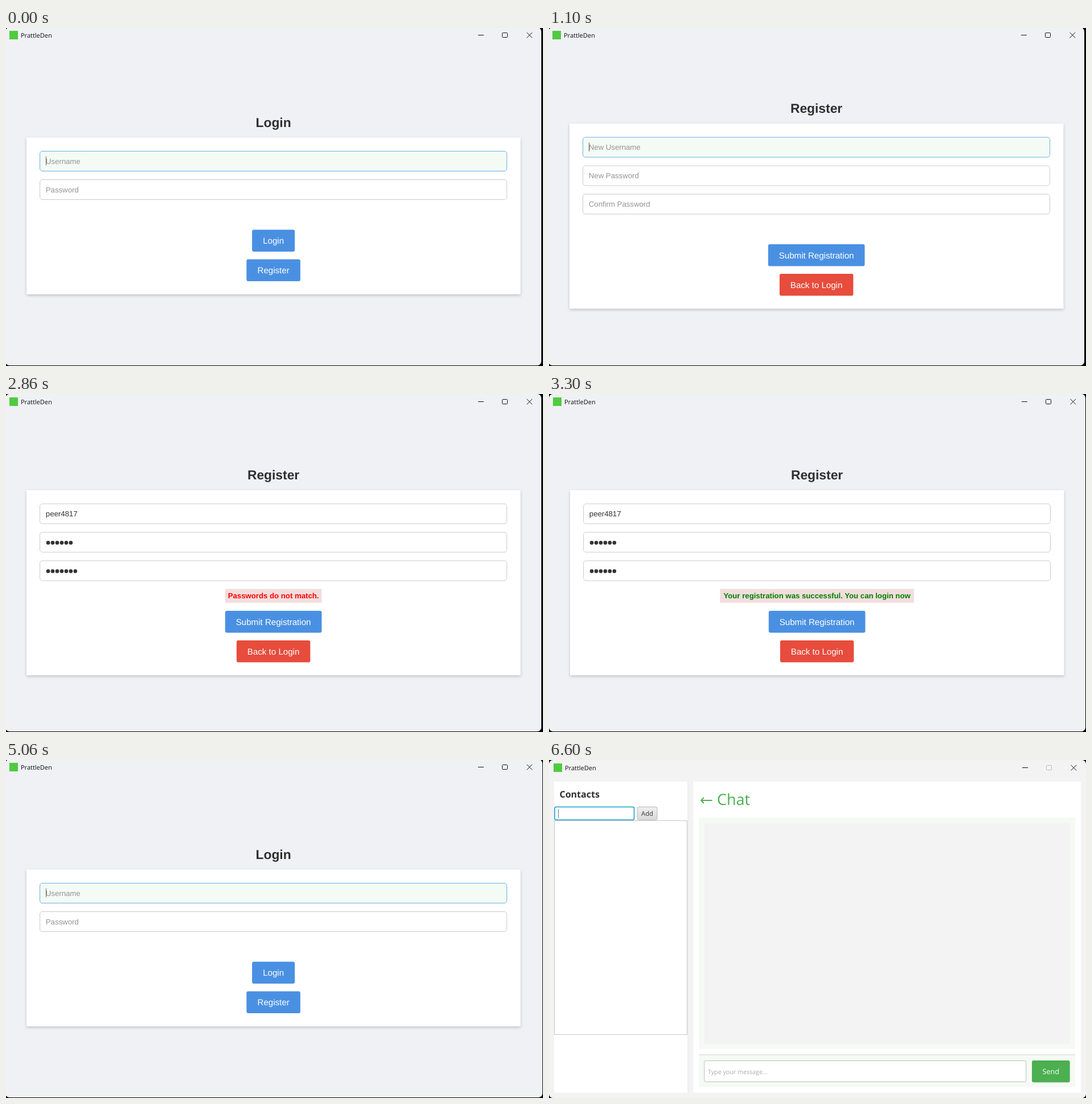
Recreate the animation shown at these times as an HTML page. Size 943 by 594 pixels, loop 7.7 s.

```html
<!DOCTYPE html>
<html lang="en">
<head>
<meta charset="utf-8">
<title>Chat sign-in</title>
<style>
  html, body { margin: 0; width: 100%; height: 100%; overflow: hidden; background: #000; }
  svg { display: block; width: 943px; height: 594px; }
  text { font-family: "Liberation Sans", Arial, sans-serif; text-rendering: geometricPrecision; white-space: pre; }
  .ui { font-family: "Open Sans", "Noto Sans", sans-serif; }
  .card { filter: drop-shadow(0 2px 2.5px rgba(0, 0, 0, .2)); }
</style>
</head>
<body>
<svg id="stage" viewBox="0 0 943 594"></svg>
<script>
const STEP = 1100;
const MID = 469.6;
const APP = 'PrattleDen';
const USER = 'peer4817';
const BLUE = '#4a90e2', RED = '#e74c3c', GREEN = '#4caf50', MINT = '#f4faf4';

const rect = (x, y, w, h, fill, more = '') =>
  `<rect x="${x}" y="${y}" width="${w}" height="${h}" fill="${fill}" ${more}/>`;
const text = (x, y, size, fill, str, more = '') =>
  `<text x="${x}" y="${y}" font-size="${size}" fill="${fill}" ${more}>${str}</text>`;
const line = (d, color, width = 1) =>
  `<path d="${d}" fill="none" stroke="${color}" stroke-width="${width}"/>`;
const at = (x, y, body) => `<g transform="translate(${x} ${y})">${body}</g>`;
const CENTER = 'text-anchor="middle"';
const BOLD = 'font-weight="bold"';
const UI = 'class="ui"';

function titleBar(canMaximize) {
  return rect(6, 5, 15, 15, '#4fcb3f') +
    text(26, 17, 11, '#111', APP, UI) +
    line('M829 12.5h10', '#111') +
    rect(871.5, 8.5, 9, 8, 'none', `rx="1" stroke="${canMaximize ? '#111' : '#bdbdbd'}"`) +
    line('M914.5 7.8l9.6 9.6m0-9.6l-9.6 9.6', '#111');
}

// value: text, or a number of password dots
function field(y, { hint, value, focus }) {
  let out = rect(59.5, y, 820, 35, focus ? MINT : '#fff',
    `rx="4.5" stroke="${focus ? '#66b2e8' : '#cacaca'}"`);
  let end = 70.4;
  if (hint) out += text(69.8, y + 22.3, 13.2, '#949494', hint);
  if (typeof value === 'string') out += text(69.8, y + 22.3, 13.2, '#333', value);
  if (typeof value === 'number') {
    for (let i = 0; i < value; i++)
      out += `<circle cx="${74 + i * 7.95}" cy="${y + 18.4}" r="3.3" fill="#333"/>`;
    end = 70.3 + value * 7.95;
  }
  if (focus) out += line(`M${end} ${y + 9}v16`, '#666');
  return out;
}

function button(y, width, color, label) {
  return rect(MID - width / 2, y, width, 38.5, color, 'rx="3"') +
    text(MID, y + 24.8, 15.1, '#fff', label, CENTER);
}

function form(title, top, height, fields, buttons, note = '') {
  return text(MID, top - 18.8, 22.8, '#2f2f2f', title, `${CENTER} ${BOLD}`) +
    rect(36, top, 867.5, height, '#fff', 'class="card"') +
    fields.map((f, i) => field(top + 24 + i * 50, f)).join('') + note +
    buttons.map((b, i) => button(top + height - 113.4 + i * 52, ...b)).join('');
}

const login = (...fields) => form('Login', 192.5, 275.5, fields,
  [[75, BLUE, 'Login'], [94.5, BLUE, 'Register']]);

const register = (fields, note) => form('Register', 168, 325.3, fields,
  [[169.6, BLUE, 'Submit Registration'], [129.4, RED, 'Back to Login']], note);

const notice = (width, color, str) =>
  rect(MID - width / 2, 341.5, width, 24.5, '#f2dede') +
  text(MID, 358.3, 13.2, color, str, `${CENTER} ${BOLD}`);

function chat() {
  return rect(9, 38, 234.5, 546.5, '#fff', 'class="side"') +
    line('M244 38v546', '#e6e6e6') +
    text(18.5, 66, 16, '#2f2f2f', 'Contacts', `${UI} ${BOLD}`) +
    rect(9.5, 106.5, 233, 376, '#fff', 'stroke="#c8c8c8"') +
    rect(10, 82.5, 139.5, 22.7, '#fff', 'rx="2.5" stroke="#1a9fcf" stroke-width="1.6"') +
    line('M16.5 86v16', '#777') +
    rect(155, 82.5, 35, 22.7, 'url(#grey)', 'rx="2.5" stroke="#b8b8b8"') +
    text(172.5, 98, 11.2, '#333', 'Add', `${UI} ${CENTER}`) +
    rect(253.5, 38, 680.5, 546.5, '#fff') +
    line('M286.5 71h-19.5m5-5l-5 5l5 5', GREEN, 1.8) +
    text(295, 79, 27, GREEN, 'Chat', UI) +
    rect(263.5, 101, 660.5, 407, '#f5faf5') +
    rect(273, 110.5, 642, 388.5, '#f3f3f3') +
    rect(263.5, 518, 660.5, 57, '#f5faf5') +
    line('M263.5 518h660.5', '#d0d0d0') +
    rect(272.8, 528.5, 565, 37, '#fff', 'rx="2.5" stroke="#bdbdbd"') +
    text(279, 551.5, 10.7, '#aaa', 'Type your message...', UI) +
    rect(848, 528, 66.7, 38.5, GREEN, 'rx="3"') +
    text(881.3, 551.8, 12.7, '#fff', 'Send', `${UI} ${CENTER}`);
}

const DEFS = `<defs><linearGradient id="grey" x2="0" y2="1">
  <stop stop-color="#efefef"/><stop offset="1" stop-color="#d9d9d9"/></linearGradient></defs>`;

// right and bottom are the window's far edges; dx, dy shift its content
function scene(dx, dy, right, bottom, body, isChat = false) {
  const x = Math.min(dx, 1) - 1, y = dy - 1;
  return DEFS + rect(0, 0, 943, 594, '#000') +
    rect(x, y, right - x, bottom - y, isChat ? '#f3f3f3' : '#f0f1f5', 'rx="7"') +
    at(dx, dy, titleBar(!isChat)) + (isChat ? body : at(dx, dy, body));
}

const emptyLogin = login({ hint: 'Username', focus: true }, { hint: 'Password' });

const scenes = [
  scene(0, 0, 940, 593, emptyLogin),
  scene(0, 0, 940, 593, register([
    { hint: 'New Username', focus: true }, { hint: 'New Password' }, { hint: 'Confirm Password' }])),
  scene(0, 1, 940, 593, register([{ value: USER }, { value: 6 }, { value: 7 }],
    notice(169.6, '#f00', 'Passwords do not match.'))),
  scene(1, 1, 942, 593, register([{ value: USER }, { value: 6 }, { value: 6 }],
    notice(340.5, '#008000', 'Your registration was successful. You can login now'))),
  scene(0, 0, 942, 593, emptyLogin),
  scene(1, 1, 942, 594, login({ value: USER }, { value: 6, focus: true })),
  scene(2, 1, 943, 594, chat(), true)
];

const stage = document.getElementById('stage');
let shown = -1;

function tick() {
  const now = Math.floor(performance.now() / STEP) % scenes.length;
  if (now !== shown) stage.innerHTML = scenes[shown = now];
  requestAnimationFrame(tick);
}
tick();
</script>
</body>
</html>
```
